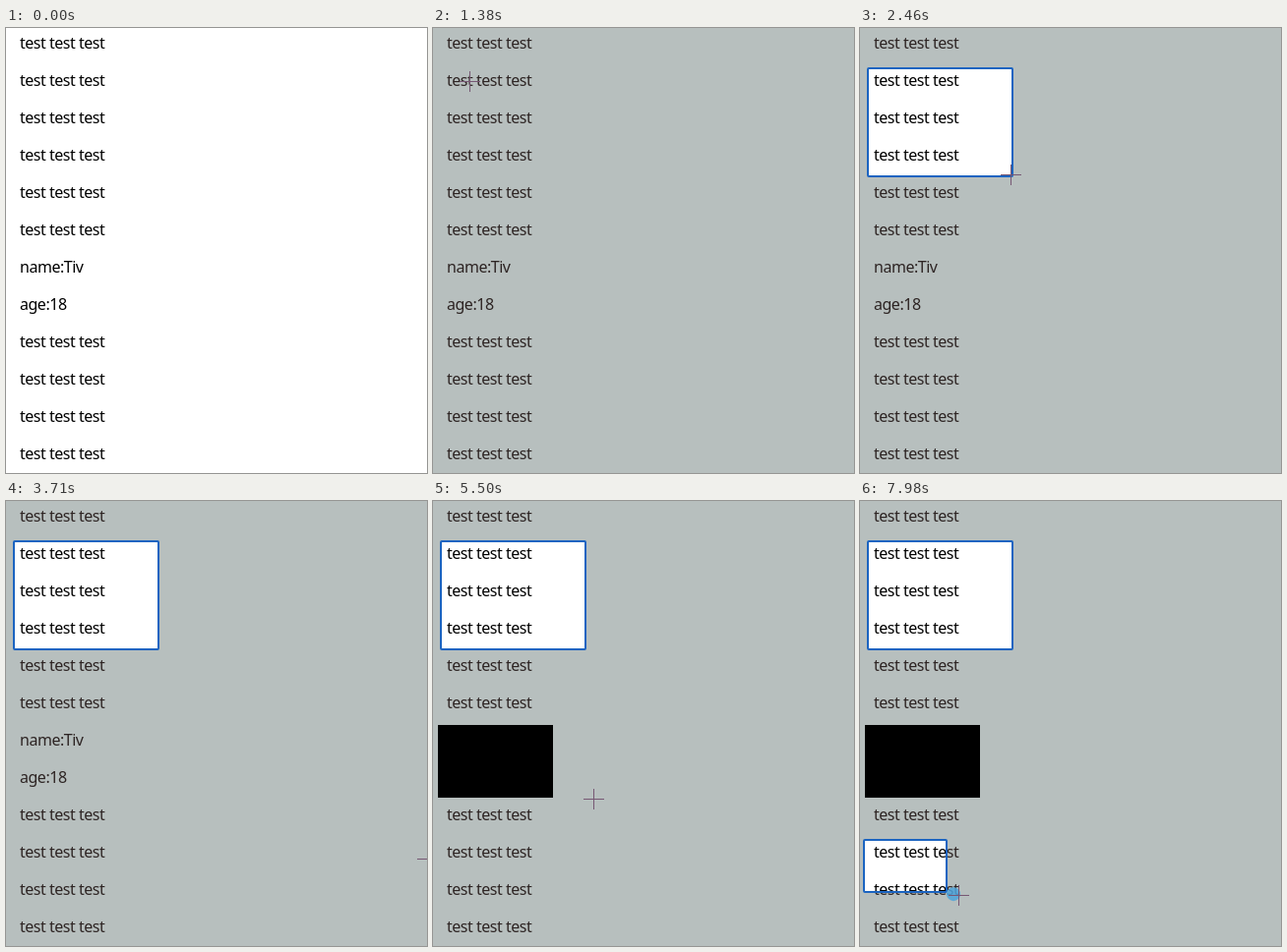
An HTML page that plays this animation: 428 by 453 pixels, repeating every 8 s.

```html
<!DOCTYPE html>
<html lang="en">
<head>
<meta charset="utf-8">
<title>Highlight and blackout</title>
<style>
html, body { margin: 0; width: 100%; height: 100%; overflow: hidden; background: #fff; }
svg { display: block; width: 428px; height: 453px; }
text { font: 16px "Noto Sans", "Open Sans", sans-serif; letter-spacing: -.48px; white-space: pre; }
</style>
</head>
<body>
<svg id="stage" viewBox="0 0 428 453">
  <defs>
    <g id="lines"></g>
  </defs>
  <rect id="page" width="428" height="453"/>
  <use id="base" href="#lines"/>
  <g id="areas"></g>
  <circle id="press" r="7" fill="#4ea3da" fill-opacity=".85"/>
  <path id="cross" d="M-10 .5h21M.5 -10v21" stroke="#765773" fill="none" shape-rendering="crispEdges"/>
</svg>
<script>
const LOOP = 8000, DIM_AT = 520, BLACK_AT = 5370;
const BOX_LAG = 1.2, PRESS_LAG = .5; // in pointer steps
const $ = id => document.getElementById(id);
const make = (tag, attrs, parent) => {
  const el = document.createElementNS("http://www.w3.org/2000/svg", tag);
  set(el, attrs);
  return parent.appendChild(el);
};
function set(el, attrs) {
  for (const k in attrs) el.setAttribute(k, attrs[k]);
}

for (let i = 0; i < 12; i++) {
  const line = make("text", { x: 14, y: 21 + 38 * i }, $("lines"));
  line.textContent = { 6: "name:Tiv", 7: "age:18" }[i] || "test test test";
}

// A filled area that shows the text at full strength inside it
function area(id) {
  const clip = make("clipPath", { id }, $("areas"));
  return {
    hole: make("rect", {}, clip),
    fill: make("rect", {}, $("areas")),
    text: make("use", { href: "#lines", "clip-path": `url(#${id})` }, $("areas")),
    edge: make("rect", { fill: "none", "stroke-width": 2, rx: 1 }, $("areas"))
  };
}
const areas = ["first", "blackout", "second"].map(area);

function drawArea(a, box, fill, stroke) {
  const on = box ? "inline" : "none";
  for (const el of [a.fill, a.text, a.edge]) el.setAttribute("display", on);
  if (!box) return;
  const [x, y, r, b] = box;
  const size = { x, y, width: Math.max(0, r - x), height: Math.max(0, b - y) };
  set(a.hole, size);
  set(a.fill, { ...size, fill });
  set(a.edge, { ...size, stroke });
  if (fill === "#000") a.text.setAttribute("display", "none");
}

const out = p => f => 1 - (1 - f) ** p;
const into = p => f => f ** p;
const lin = f => f;

// Pointer strokes: start, end, steps, from, to, easing per axis
const moves = [
  { t0: 740, t1: 1500, n: 20, a: [428, 228], b: [15, 44], ex: out(1.6), ey: out(1.6) },
  { t0: 1580, t1: 1740, n: 5, a: [15, 44], b: [8, 41], ex: lin, ey: lin },
  { t0: 1940, t1: 2460, n: 14, a: [8, 41], b: [153, 149], ex: out(1.93), ey: out(2.15),
    area: 0, box: [8, 41, 155, 151] },
  { t0: 2660, t1: 2950, n: 8, a: [153, 149], c: [35, 150], b: [254, 257], ex: lin, ey: lin, leave: true },
  { t0: 3710, t1: 4480, n: 19, a: [428, 364], c: [190, 200], b: [5, 227], ex: out(1.5), ey: out(1.5) },
  { t0: 4520, t1: 5290, n: 16, a: [5, 228], b: [118, 301], ex: out(1.27), ey: out(2.08),
    area: 1, box: [5, 228, 122, 302] },
  { t0: 5330, t1: 5780, n: 12, a: [120, 302], b: [282, 304], ex: into(1.3), ey: lin, leave: true },
  { t0: 6660, t1: 7380, n: 17, a: [403, 450], b: [4, 344], ex: out(1.5), ey: out(1.5) },
  { t0: 7470, t1: 7980, n: 11, a: [4, 344], b: [100, 401], ex: into(1.03), ey: out(1.4),
    area: 2, box: [4, 345] }
];

// Index of the current step, moving in discrete jumps
function stepAt(m, t) {
  const gap = (m.t1 - m.t0) / (m.n - 1);
  return Math.min(m.n - 1, Math.floor((t - m.t0) / gap + .2));
}

function place(m, step) {
  const f = Math.max(0, step) / (m.n - 1);
  return [m.ex, m.ey].map((ease, k) => {
    const u = ease(f);
    const c = m.c ? m.c[k] : (m.a[k] + m.b[k]) / 2;
    return m.a[k] * (1 - u) ** 2 + 2 * u * (1 - u) * c + m.b[k] * u * u;
  });
}

function dragBox(m, t) {
  if (t < m.t0) return null;
  if (m.box.length === 4 && t >= m.t1) return m.box;
  const [x, y] = place(m, stepAt(m, t) - BOX_LAG).map(Math.floor);
  return [m.box[0], m.box[1], x, y];
}

function draw(t) {
  const dim = t >= DIM_AT;
  $("page").setAttribute("fill", dim ? "#b7bfbe" : "#fff");
  $("base").setAttribute("fill", dim ? "#2d2423" : "#000");

  for (const m of moves) {
    if (!m.box) continue;
    const hide = m.area === 1;
    const fill = hide ? (t >= BLACK_AT ? "#000" : "#765773") : "#fff";
    drawArea(areas[m.area], dragBox(m, t), fill, hide ? "none" : "#1b64c1");
  }

  const m = moves.filter(v => t >= v.t0).pop();
  const shown = m && !(m.leave && t >= m.t1);
  const pressed = m && m.box && (t < m.t1 || m.area === 2);
  $("cross").setAttribute("display", shown ? "inline" : "none");
  $("press").setAttribute("display", pressed ? "inline" : "none");
  if (!shown) return;
  const step = stepAt(m, t);
  const [x, y] = place(m, step).map(Math.round);
  $("cross").setAttribute("transform", `translate(${x} ${y})`);
  if (pressed) {
    const [cx, cy] = place(m, step - PRESS_LAG);
    set($("press"), { cx, cy });
  }
}

const start = performance.now();
function frame() {
  draw((performance.now() - start) % LOOP);
  requestAnimationFrame(frame);
}
draw(0);
requestAnimationFrame(frame);
</script>
</body>
</html>
```
